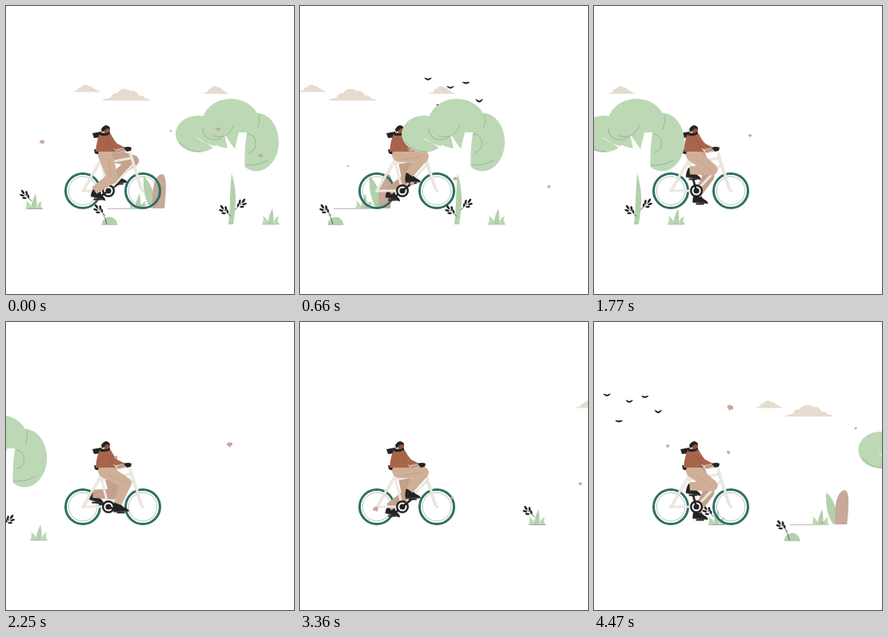
Animation of 360x360 px, one loop 4.5 s. Source, as an HTML page with a canvas:

```html
<!DOCTYPE html>
<html lang="en">
<head>
<meta charset="utf-8">
<title>Bicycle ride</title>
<style>
html, body { margin: 0; width: 100%; height: 100%; overflow: hidden; background: #fff; }
canvas { display: block; width: 360px; height: 360px; }
</style>
</head>
<body>
<canvas id="stage" width="360" height="360"></canvas>
<script>
const ctx = document.getElementById('stage').getContext('2d');
const LOOP = 4500, STEP = 30, SCROLL = 0.1288, SPAN = 694, TURN = 1350;
const INK = '#242324', GREEN = '#bcd8b5', SAGE = '#b3d0ad', PINK = '#c8a898';
const TEAL = '#2f6f63', CREAM = '#ebe8df', CLOUD = '#e5dccf';
const PANTS = '#d0af99', PANTS_FAR = '#c4a28d', SHIRT = '#a7654b', SKIN = '#8a5541';

function fill(color, d) {
  ctx.fillStyle = color;
  ctx.fill(new Path2D(d));
}

function stroke(color, width, d) {
  ctx.strokeStyle = color;
  ctx.lineWidth = width;
  ctx.stroke(new Path2D(d));
}

function oval(color, x, y, rx, ry = rx, turn = 0) {
  ctx.fillStyle = color;
  ctx.beginPath();
  ctx.ellipse(x, y, rx, ry, turn, 0, Math.PI * 2);
  ctx.fill();
}

function ring(color, width, x, y, r) {
  ctx.strokeStyle = color;
  ctx.lineWidth = width;
  ctx.beginPath();
  ctx.arc(x, y, r, 0, Math.PI * 2);
  ctx.stroke();
}

function at(x, y, draw, sx = 1, sy = sx) {
  ctx.save();
  ctx.translate(x, y);
  ctx.scale(sx, sy);
  draw();
  ctx.restore();
}

function cloud() {
  fill(CLOUD, 'M-30 8C-25 5 -22 5 -19 4C-18 -2 -13 -3 -11 -2C-9 -9 2 -10 6 -5' +
    'C10 -7 15 -3 16 1C20 0 23 3 24 5C27 5 29 6 31 8Z');
}

// Dark sprig whose stem runs down to the right
function sprig() {
  stroke(INK, 0.7, 'M-3 -3Q3 1 9 8');
  oval(INK, -2, -3.6, 3, 1.4, 0.9);
  oval(INK, 2.8, -2.2, 2.9, 1.4, 1.4);
  oval(INK, 5, 1.8, 2.4, 1.2, 1.3);
  oval(INK, -3, 0.6, 2.9, 1.3, 0.3);
  oval(INK, 0, 4, 2.8, 1.3, 0.1);
}

function grass() {
  fill(GREEN, 'M-11 10Q-8 3 -10 -1Q-4 3 -2 10Z M3 10Q4 1 10 0Q7 5 11 10Z');
  fill(SAGE, 'M-4 10Q-3 0 2 -10Q4 2 3 10Z');
}

function backPlants() {
  at(23, 236, sprig);
  at(35, 244, grass);
  stroke('#8b8d88', 0.6, 'M27 253.5H46');

  stroke('#8b8d88', 0.6, 'M127 253.5H161');
  at(165, 244, grass);
  oval(PINK, 168, 251, 2.5, 1.5);
  fill(SAGE, 'M181 253C174 244 171 230 172 213C180 219 186 233 187 253Z');
  fill(PINK, 'M184 253C181 232 185 212 195 210C202 211 200 233 198 253Z');

  fill(SAGE, 'M119.500 274C120 261 138 260 139.500 274Z');
  stroke(INK, 0.6, 'M121 260Q125 265 126 273');
  at(115, 254, sprig);
}

function tree() {
  fill('#fff', 'M278 183L298 176Q298 218 299 240Q300 263 305 273H280Q286 232 281 205Z');
  oval(GREEN, 240, 160, 28, 23);
  oval(GREEN, 313, 170, 28, 36.5);
  oval(GREEN, 281, 147, 36, 31);
  fill('#fff', 'M236 163C248 173 263 174 270 181L278 183L273 160L286 179L291 158H301' +
    'Q297 184 299 208L281 210Q276 195 268 189Q259 184 249 184Q260 183 266 183Q255 173 236 163Z');
  const line = '#7f9d80';
  stroke(line, 0.6, 'M246 153Q246 165 258 167Q268 168 272 162M258 162Q277 168 285 149');
  stroke(line, 0.6, 'M302 160C316 161 315 182 303 183M299 199Q314 200 327 193');
  stroke(line, 0.5, 'M316 136Q318 145 314 154M217 170Q228 183 244 182');

  fill(SAGE, 'M282 209Q288 230 287 246Q286 260 284 273H278Q280 252 280 240Q281 220 282 209Z');
  at(272, 255, sprig);
  at(295, 247, sprig, -1, 1);
  at(331, 263, grass);
  stroke('#9a9e96', 0.5, 'M320 273H341');
}

function clouds() {
  at(100, 103, cloud, 0.57, 0.56);
  at(150, 111, cloud, 1, 0.9);
  at(262, 105, cloud, 0.54, 0.6);
}

// [dx, dy, drop while approaching, wing lift]
const flock = [[0, 91, 0, 1.6], [28, 99, 2.5, 1.6], [47.5, 93, 2.5, 0.3], [64, 112, 6.500, 2.6], [15, 123.500, 0, 0.2]];

function birds(t) {
  const x = t < 2200 ? 160 - 0.31 * (t - 660) : 210 - 0.323 * (t - 3870);
  const drop = Math.max(0, Math.min(1, (x - 30) / 125));
  flock.forEach(([dx, dy, fall, lift]) => at(x + dx, dy + fall * drop, () => {
    fill(INK, `M-5 ${-lift}Q-2 ${-1.5} 0 0Q2 -1.500 5 ${-lift}Q3 1.500 0 2Q-3 1.500 -5 ${-lift}Z`);
  }));
}

// Each path: size, then waypoints of time, x, y
const drifts = [
  [3.4, [0, 45, 170], [300, -12, 184]],
  [1.5, [0, 206, 156], [660, 60, 200], [990, -8, 220]],
  [3, [0, 265, 154], [660, 140, 222], [1080, 50, 262], [1380, -8, 268]],
  [3, [0, 318, 187], [660, 194, 216], [1080, 133, 255], [1620, -8, 276]],
  [2.3, [390, 363, 215], [660, 311, 226], [1080, 261, 214], [1770, 195, 162], [2820, 69, 178], [3240, 64, 184], [3270, 64, 184]],
  [2.2, [1080, 308, 250], [1350, 262, 270], [1650, 230, 277]],
  [3.8, [1830, 363, 190], [2190, 290, 150], [2820, 178, 185], [3300, 100, 230], [3780, 57, 262]],
  [2.3, [2280, 297, 180], [2820, 235, 162], [3360, 190, 220], [3870, 157, 262], [4320, 49, 270]],
  [2.4, [3300, 363, 200], [3870, 243, 222], [4470, 92, 155]],
  [2.4, [3510, 363, 205], [3870, 287, 219], [4470, 168, 163]],
  [4.2, [4020, 363, 150], [4260, 245, 124], [4470, 170, 107]],
  [1.8, [4320, 363, 128], [4470, 327, 133]]
];

function leaves(t) {
  for (const [size, ...points] of drifts) {
    const i = points.findIndex((p, k) => k && t <= p[0]);
    if (i < 1 || t < points[0][0]) continue;
    const [t0, x0, y0] = points[i - 1], [t1, x1, y1] = points[i];
    const k = (t - t0) / (t1 - t0);
    at(x0 + (x1 - x0) * k, y0 + (y1 - y0) * k, () => {
      ctx.rotate(Math.sin(t / 260 + size) * 0.6);
      fill(PINK, 'M-1 -.1Q-.5 -1 .3 -.7Q1 -.7 1 .2Q.4 .2 .2 1Q-.3 .5 -1 -.1Z');
    }, size);
  }
}

function wheel(x) {
  ring(TEAL, 3, x, 231, 21.5);
  ring('#8fb0a7', 0.7, x, 231, 17.8);
  oval(CREAM, x, 231, 2);
}

function frame() {
  stroke(CREAM, 3, 'M96 231L118 193M96 231H128L117 187M128 231L160 197M119 197L157 190');
  stroke(CREAM, 3.4, 'M170 230L155 183');
  stroke('#cfcbc0', 0.5, 'M98 231L119 196M168 229L154 187');
  fill(INK, 'M110 179Q117 180 124 183L123 186Q115 186 111 184Z');
}

function sprocket() {
  oval(INK, 128, 231, 8);
  ring('#fff', 2, 128, 231, 4.6);
}

function limb(color, a, b, wa, wb) {
  const d = Math.atan2(b.y - a.y, b.x - a.x) + Math.PI / 2;
  const c = Math.cos(d) / 2, s = Math.sin(d) / 2;
  fill(color, `M${a.x + c * wa} ${a.y + s * wa}L${b.x + c * wb} ${b.y + s * wb}` +
    `L${b.x - c * wb} ${b.y - s * wb}L${a.x - c * wa} ${a.y - s * wa}Z`);
}

function leg(color, angle, hip) {
  const pedal = { x: 128 + 17 * Math.cos(angle), y: 231 + 16 * Math.sin(angle) };
  const ankle = { x: pedal.x - 4, y: pedal.y - 10 };
  const thigh = 30, shin = 28;
  const dx = ankle.x - hip.x, dy = ankle.y - hip.y;
  const reach = Math.min(Math.hypot(dx, dy), thigh + shin - 0.2);
  const bend = Math.acos((thigh ** 2 + reach ** 2 - shin ** 2) / (2 * thigh * reach));
  const aim = Math.atan2(dy, dx) - bend;
  const knee = { x: hip.x + thigh * Math.cos(aim), y: hip.y + thigh * Math.sin(aim) };

  stroke(INK, 2.6, `M128 231L${pedal.x} ${pedal.y}`);
  stroke(INK, 2, `M${pedal.x - 5} ${pedal.y + 1}h10`);
  at(pedal.x, pedal.y, () => {
    ctx.rotate(0.13 - 0.2 * Math.cos(angle));
    fill(INK, 'M-8 -12L0 -12Q1 -7 5 -5Q10 -3 10 0H-9Q-10 -5 -8 -12Z');
    stroke('#5b4440', 0.8, 'M-9 -.5H10');
  });
  limb(color, hip, knee, 18, 14);
  oval(color, knee.x, knee.y, 7);
  limb(color, knee, ankle, 14, 10);
  oval(color, hip.x, hip.y, 9);
  stroke('#b18e79', 0.5, `M${hip.x + 4} ${hip.y + 6}L${knee.x - 2} ${knee.y}`);
}

function torso() {
  fill(INK, 'M108 159L119 157L121 164L110 165Z');
  fill(SHIRT, 'M117 160Q124 156 131 160Q135 168 139 172L149 177L147 182Q138 181 134 177L137 182H112Q113 169 117 160Z');
  stroke('#7f4938', 0.5, 'M127 166Q130 174 137 179');
  oval(SKIN, 126, 154.500, 4, 4.8);
  fill(INK, 'M118 158Q124 161 130 157L130 160Q123 164 117 161Z');
  fill(INK, 'M119 154Q121 150 125 149Q130 150 130 154Q125 151 123 156L120 158Z');
  fill(PANTS, 'M137 179L147 177L152 178L150 182L140 184Z');
  stroke(SKIN, 0.7, 'M139 182L148 179');
  fill(INK, 'M147 177Q153 175 157 177L156 181L151 182Z');
}

function rider(t) {
  const angle = 143 * Math.PI / 180 + t / TURN * Math.PI * 2;
  wheel(96);
  wheel(171);
  leg(PANTS_FAR, angle + Math.PI, { x: 130, y: 186 });
  frame();
  sprocket();
  leg(PANTS, angle, { x: 124, y: 186 });
  torso();
}

function eachCopy(t, draw) {
  for (const start of [0, SPAN]) at(start - SCROLL * t, 0, draw);
}

function render(t) {
  ctx.fillStyle = '#fff';
  ctx.fillRect(0, 0, 360, 360);
  eachCopy(t, clouds);
  birds(t);
  eachCopy(t, backPlants);
  rider(t);
  eachCopy(t, tree);
  leaves(t);
}

const began = performance.now();
function tick() {
  const t = (performance.now() - began) % LOOP;
  render(Math.floor(t / STEP) * STEP);
  requestAnimationFrame(tick);
}
tick();
</script>
</body>
</html>
```
